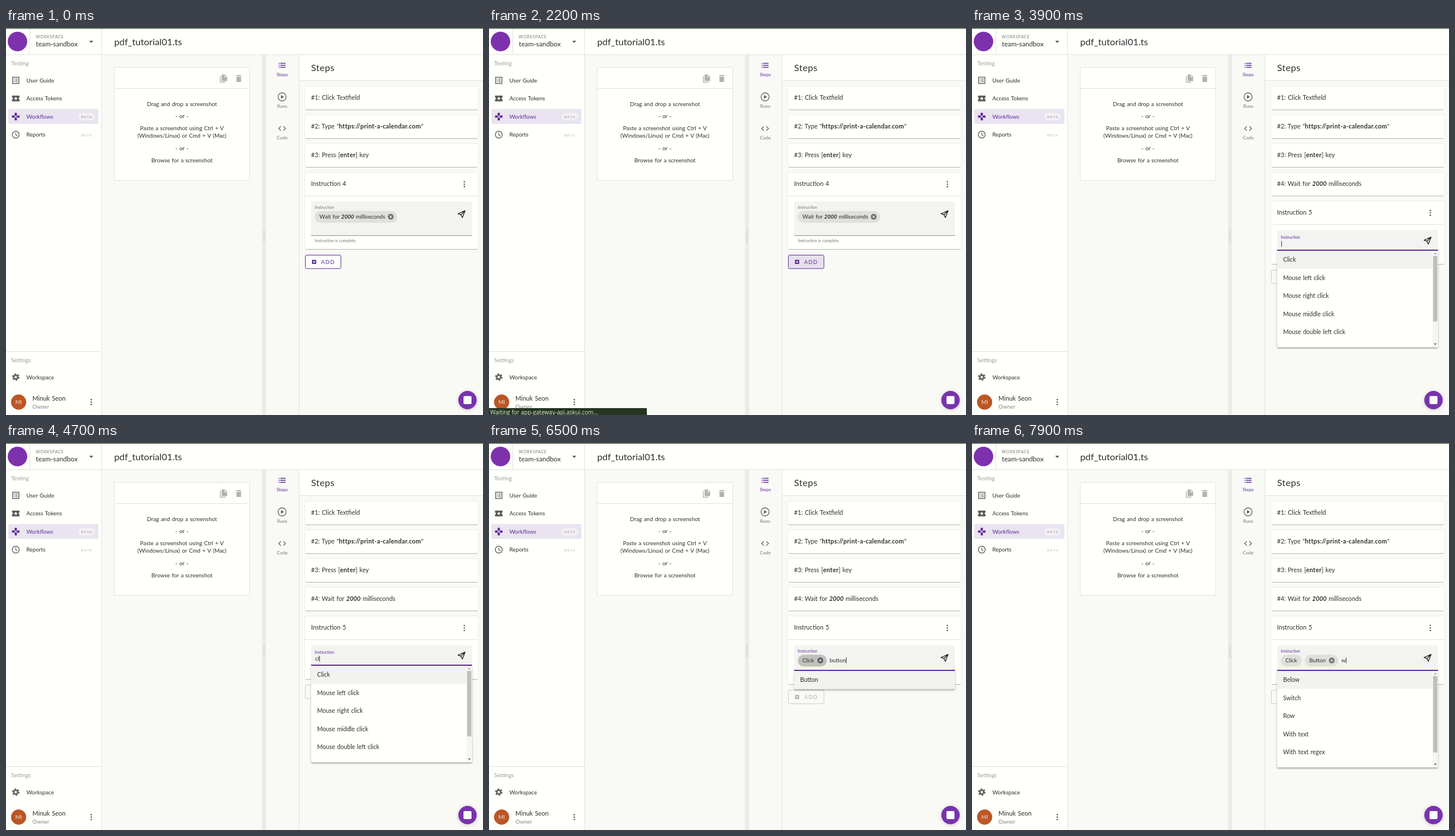
An HTML page that plays this animation: 831x674 px, repeating every 8 s.

```html
<!DOCTYPE html>
<html lang="en">
<head>
<meta charset="utf-8">
<title>Workflow editor</title>
<style>
  html, body { margin: 0; width: 100%; height: 100%; overflow: hidden; background: #fffffc; }
  svg { display: block; width: 831px; height: 674px; }
  text { font-family: Lato, "Open Sans", sans-serif; word-spacing: .07em; white-space: pre; }
  .b { font-weight: 700; letter-spacing: .03em; }
  .bi { font-weight: 700; font-style: italic; }
  .status { font-family: "Open Sans", "Noto Sans", sans-serif; word-spacing: 0; }
  .card { filter: drop-shadow(0 .5px .8px rgba(0, 0, 0, .12)); }
  .menu { filter: drop-shadow(0 2px 1.4px rgba(0, 0, 0, .32)); }
  .float { filter: drop-shadow(0 1px 3px rgba(0, 0, 0, .2)); }
</style>
</head>
<body>
<svg viewBox="0 0 831 674" xmlns="http://www.w3.org/2000/svg">
  <g id="base"></g>
  <g id="live"></g>
  <rect id="caret" width="1" height="10" fill="#333"/>
  <g id="top"></g>
</svg>
<script>
const LOOP = 8000;
const INK = '#2d2d2d', GREY = '#757573', PALE = '#9b9b99', LINE = '#e2e2df';
const PAPER = '#fffffc', WASH = '#f9faf6', PURPLE = '#5f2c9b';
const $ = id => document.getElementById(id);

const text = (x, y, s, size = 9.8, fill = INK, extra = '') =>
  `<text x="${x}" y="${y}" font-size="${size}" fill="${fill}" ${extra}>${s}</text>`;
const rect = (x, y, w, h, fill, extra = '') =>
  `<rect x="${x}" y="${y}" width="${w}" height="${h}" fill="${fill}" ${extra}/>`;
const circle = (x, y, r, fill, extra = '') =>
  `<circle cx="${x}" cy="${y}" r="${r}" fill="${fill}" ${extra}/>`;
const path = (d, fill, extra = '') => `<path d="${d}" fill="${fill}" ${extra}/>`;
const stroke = (d, color, width = 1.2) =>
  path(d, 'none', `stroke="${color}" stroke-width="${width}"`);
const at = (x, y, s) => `<g transform="translate(${x} ${y})">${s}</g>`;
const dots = (x, y) => [-4.2, 0, 4.2].map(d => circle(x, y + d, 1.25, '#555')).join('');

const icon = {
  guide: rect(-5.5, -5.5, 11, 11, 'none', 'stroke="#555" stroke-width="1.3"') +
    stroke('M-3.5-2.5h1.5M-1-2.5h4.5M-3.5 0h1.5M-1 0h4.5M-3.5 2.5h1.5M-1 2.5h4.5', '#555', 1.1),
  token: path('M-6.5-5h13v3.4a1.6 1.6 0 0 0 0 3.2V5h-13V1.6a1.6 1.6 0 0 0 0-3.2z', '#555') +
    path('M0-3.4 1-1h2.5L1.5.6 2.2 3 0 1.6-2.2 3-1.5.6-3.5-1H-1z', PAPER),
  flow: [0, 90, 180, 270].map(a =>
    path('M-2-6.5h4v3.7L0-.8-2-2.8z', PURPLE, `transform="rotate(${a})"`)).join(''),
  clock: circle(0, 0, 6, 'none', 'stroke="#555" stroke-width="1.3"') + stroke('M0-3.6V.4L2.8 2', '#555', 1.1),
  gear: circle(0, 0, 5.4, 'none', 'stroke="#666" stroke-width="2.4" stroke-dasharray="2.8 2.85"') +
    circle(0, 0, 3.4, 'none', 'stroke="#666" stroke-width="2.8"'),
  copy: stroke('M-5.6-4V6.5H3.2', '#b2b2b0', 1.4) +
    path('M-3.4-7H2.2L6.2-3V4.4H-3.4zM1.6-5.8v3.4H5z', '#b2b2b0', 'fill-rule="evenodd"'),
  trash: path('M-4-3h8v9h-8zM-4.8-5.4h2.5l.8-.9h3l.8.9h2.5v1.4h-9.6z', '#b2b2b0'),
  list: stroke('M-6-3.6h1.6M-3.2-3.6H6M-6 0h1.6M-3.2 0H6M-6 3.6h1.6M-3.2 3.6H6', PURPLE, 1.5),
  play: circle(0, 0, 7, 'none', 'stroke="#666" stroke-width="1.3"') + path('M-2-3.3 3.3 0-2 3.3z', '#666'),
  code: stroke('M-2.2-3.8-6 0l3.8 3.8M2.2-3.8 6 0 2.2 3.8', '#666', 1.3),
  send: path('M-6-.5 6.3-5.8 1.5 6.3-.9 1.2zM-.9 1.2 6.3-5.8', 'none',
    'stroke="#222" stroke-width="1.35" stroke-linejoin="round"'),
  cross: stroke('M-1.8-1.8 1.8 1.8M1.8-1.8-1.8 1.8', '#e6e6e3', 1.2)
};

function shell() {
  let s = rect(0, 0, 831, 674, PAPER);
  s += rect(167, 46, 664, 628, WASH) + rect(511, 46, 320, 46, PAPER);
  s += rect(446, 46, 7, 628, '#ebebe8');
  for (let y = 352; y < 373; y += 2.5)
    s += rect(447.5, y, 1, 1, '#b5b5b3') + rect(450, y, 1, 1, '#b5b5b3');
  s += rect(0, 46, 831, 1, LINE) + rect(166, 1, 1, 673, LINE) + rect(41, 1, 1, 45, LINE) +
    rect(510, 46, 1, 628, LINE) + rect(511, 91, 320, 1, LINE) + rect(0, 563, 166, 1, LINE);
  s += rect(0, 0, 831, 1.3, '#466642');

  // Header
  s += circle(20, 23.5, 17, '#7d31ad');
  s += text(52, 18.4, 'WORKSPACE', 6.8, GREY, 'letter-spacing=".8"') + text(52, 32, 'team-sandbox', 11.7);
  s += path('M145 22.3h7l-3.5 3.6z', '#555') + text(188.5, 29.5, 'pdf_tutorial01.ts', 16.2);

  // Sidebar
  s += text(9, 64.8, 'Testing', 9.8, PALE) + rect(4, 141, 157, 26, '#e9e4ef', 'rx="2"');
  [['guide', 'User Guide'], ['token', 'Access Tokens'], ['flow', 'Workflows'], ['clock', 'Reports']]
    .forEach(([name, label], i) => {
      const y = 91.2 + i * 31.5;
      s += at(17, y, icon[name]) + text(35.5, y + 3.6, label, 9.8, i === 2 ? PURPLE : INK);
    });
  s += rect(126, 148, 29, 13, '#f3f0f5', 'rx="6.5"');
  s += text(131, 157, 'BETA', 6.4, '#9d9aa2', 'letter-spacing="1.1"') +
    text(131, 188.5, 'BETA', 6.4, '#b9b9b7', 'letter-spacing="1.1"');
  s += text(9, 581.7, 'Settings', 9.8, PALE) + at(17, 608, icon.gear) + text(35.5, 612, 'Workspace');
  s += circle(22, 651.5, 13.2, '#bb5626') + text(22, 655, 'MI', 9.6, '#f6dfd3', 'text-anchor="middle"');
  s += text(46, 649.2, 'Minuk Seon', 10.9) + text(46, 663, 'Owner', 9.6, '#858583') + dots(148.5, 651.5);

  // Screenshot card
  s += rect(188.5, 68.5, 236, 197, PAPER, `stroke="${LINE}" rx="1.5"`) + rect(189, 105, 235, 1, LINE);
  s += at(379, 88, icon.copy) + at(405.5, 88, icon.trash);
  [['Drag and drop a screenshot', 136], ['- or -', 157.3], ['Paste a screenshot using Ctrl + V', 178.3],
    ['(Windows/Linux) or Cmd + V (Mac)', 191.3], ['- or -', 212.5], ['Browse for a screenshot', 233.5]]
    .forEach(([label, y]) => s += text(306.5, y, label, 9.9, INK, 'text-anchor="middle"'));

  // Tabs
  [['list', 'Steps', 65, PURPLE], ['play', 'Runs', 120, GREY], ['code', 'Code', 175, GREY]]
    .forEach(([name, label, y, color]) =>
      s += at(481, y, icon[name]) + text(481.3, y + 18.7, label, 8.2, color, 'text-anchor="middle"'));

  s += text(531.5, 75, 'Steps', 16.2, INK, 'letter-spacing=".4"');
  s += step(0, 'Click Textfield') + step(1, 'Type "<tspan class="b">https://print-a-calendar.com</tspan>"') +
    step(2, 'Press [<tspan class="b">enter</tspan>] key');
  return s;
}

const WAIT = 'Wait for <tspan class="bi">2000</tspan> milliseconds';
const box = (y, h) => rect(521.5, y + 2, 300.5, h - 1, '#bdbdbb', 'rx="2.5"') +
  rect(521, y, 301.5, h, PAPER, 'rx="2.5" class="card"');
const step = (i, label) =>
  box(102 + i * 50, 40) + text(531.5, 125 + i * 50, `#${i + 1}: ${label}`, 10.75);

function chip(x, y, w, label, fill, close) {
  const mark = close ? circle(x + w - 11.3, y + 10, 5, close) + at(x + w - 11.3, y + 10, icon.cross) : '';
  return rect(x, y, w, 20.5, fill, 'rx="10.2"') + text(x + 8, y + 13.3, label, 9.6) + mark;
}

function field(y, h, focus) {
  return path(`M531.5 ${y + h}v${3 - h}q0-3 3-3h274.5q3 0 3 3v${h - 3}z`, '#f3f3f1') +
    (focus ? rect(531.5, y + h - 2, 280.5, 2, PURPLE) : rect(531.5, y + h - 1, 280.5, 1, '#8c8c8a'));
}

const card = (n, y, h) => box(y, h) + text(531.5, y + 23, `Instruction ${n}`, 10.75) +
  dots(798.5, y + 20) + rect(521, y + 40, 301.5, 1, LINE);

function addButton(y, on) {
  const color = on ? PURPLE : '#b3b3b1', edge = on ? PURPLE : '#cbcbc9';
  return rect(521.5, y + .5, 62, 23.5, on ? PAPER : 'none', `id="${on ? 'add' : 'off'}" stroke="${edge}" rx="2.5"`) +
    rect(533, y + 8.7, 7.4, 7.4, color, 'rx="1"') +
    stroke(`M534.6 ${y + 12.4}h4.2M536.7 ${y + 10.3}v4.2`, PAPER, 1) +
    text(549, y + 15.9, 'ADD', 9.4, color, 'letter-spacing="1.1"');
}

function menu(y, { items, thumb }) {
  const many = items.length > 1, h = many ? 168 : 31.5;
  let s = rect(531.5, y, 280.5, h, PAPER, 'rx="2" class="menu"') +
    rect(531.5, y, many ? 271 : 280.5, 31.3, '#f2f2ef');
  items.forEach((label, i) => s += text(542, y + 19.4 + i * 31.5, label, 10.45));
  if (many) {
    s += rect(802.5, y, 9.5, h, '#f5f5f3') + rect(803.3, y + 9, 7.4, thumb, '#bebebc');
    s += path(`M804.8 ${y + 6}h4.6l-2.3-2.6z`, '#999') + path(`M804.8 ${y + h - 6.5}h4.6l-2.3 2.6z`, '#444');
  }
  return s;
}

const CLICKS = { thumb: 114, items: ['Click', 'Mouse left click', 'Mouse right click', 'Mouse middle click', 'Mouse double left click'] };
const ELEMENTS = { thumb: 40, items: ['Other element', 'Switch', 'Container', 'Checkbox', 'Element'] };
const BUTTON = { items: ['Button'] };
const RELATIONS = { thumb: 133, items: ['Below', 'Switch', 'Row', 'With text', 'With text regex'] };

// Start time, chip count, typed text, open menu
const steps = [
  [0], [2700, 0, ''], [3700, 0, '', CLICKS], [4400, 0, 'c', CLICKS], [4600, 0, 'cl', CLICKS],
  [5200, 1, '', ELEMENTS],
  ...[...'button'].map((_, i) => [5900 + i * 100, 1, 'button'.slice(0, i + 1), i < 2 ? ELEMENTS : BUTTON]),
  [7000, 2, '', RELATIONS], [7600, 2, 'w', RELATIONS]
];

function firstForm() {
  return card(4, 252, 133) + field(302, 60) + text(538, 315, 'Instruction', 7.1, GREY) +
    chip(538, 318.8, 143.5, WAIT, '#dfdfdc', '#70706e') + at(793.5, 324, icon.send) +
    text(538, 372.6, 'Instruction is complete.', 7, GREY) + addButton(395, true);
}

const inputX = chips => [538.5, 593.5, 643.5][chips];

function nextForm(chips, typed, list) {
  const grow = chips ? 9 : 0;
  let s = step(3, WAIT) + card(5, 302, 109 + grow) + addButton(421 + grow, false);
  s += (list ? menu(388 + grow, list) : '') + field(352, 36 + grow, list);
  s += at(793.5, chips ? 374 : 370, icon.send);
  s += list ? text(538, chips ? 365 : 366.7, 'Instruction', 7.1, PURPLE) : text(538, 374, 'Instruction', 9.5, GREY);
  if (chips === 1) s += chip(538, 368.7, 50.5, 'Click', '#c0c0be', '#555');
  if (chips === 2) s += chip(538, 368.7, 36.5, 'Click', '#dfdfdc') + chip(579.5, 368.7, 58.5, 'Button', '#dfdfdc', '#70706e');
  return s + text(inputX(chips), chips ? 382 : 379.3, typed, 9.6, INK, 'id="typed"');
}

$('base').innerHTML = shell();
$('top').innerHTML = circle(804, 648, 16, '#7833ad', 'class="float"') + rect(797, 641, 14, 14, '#fff', 'rx="2"') +
  `<g id="status">${rect(0, 662, 275, 12, '#24361f')}${text(2, 672.6, 'Waiting for app-gateway-api.askui.com...', 10, '#e8ebe4', 'class="status"')}</g>`;

const ramp = (t, from, to) => Math.min(1, Math.max(0, (t - from) / (to - from)));
const show = (el, on) => el.setAttribute('visibility', on ? 'visible' : 'hidden');
const start = performance.now();
let shown = -1;

function frame(now) {
  const t = Math.max(0, now - start) % LOOP;
  const i = steps.findLastIndex(s => s[0] <= t);
  const [since, chips, typed, list] = steps[i];
  if (i !== shown) {
    shown = i;
    $('live').innerHTML = i ? nextForm(chips, typed, list) : firstForm();
    if (list) {
      $('caret').setAttribute('x', inputX(chips) + $('typed').getComputedTextLength() + .3);
      $('caret').setAttribute('y', chips ? 373.5 : 370.8);
    }
  }
  if (!i) {
    const tint = .05 * ramp(t, 1000, 1300) + .1 * ramp(t, 1700, 2100);
    const mix = (a, b) => Math.round(a + (b - a) * tint);
    $('add').setAttribute('fill', `rgb(${mix(255, 95)},${mix(255, 44)},${mix(252, 155)})`);
  }
  show($('caret'), list && (t - since) % 1000 < 500);
  show($('status'), t >= 1800 && t < 2700);
  requestAnimationFrame(frame);
}
frame(start);
</script>
</body>
</html>
```
